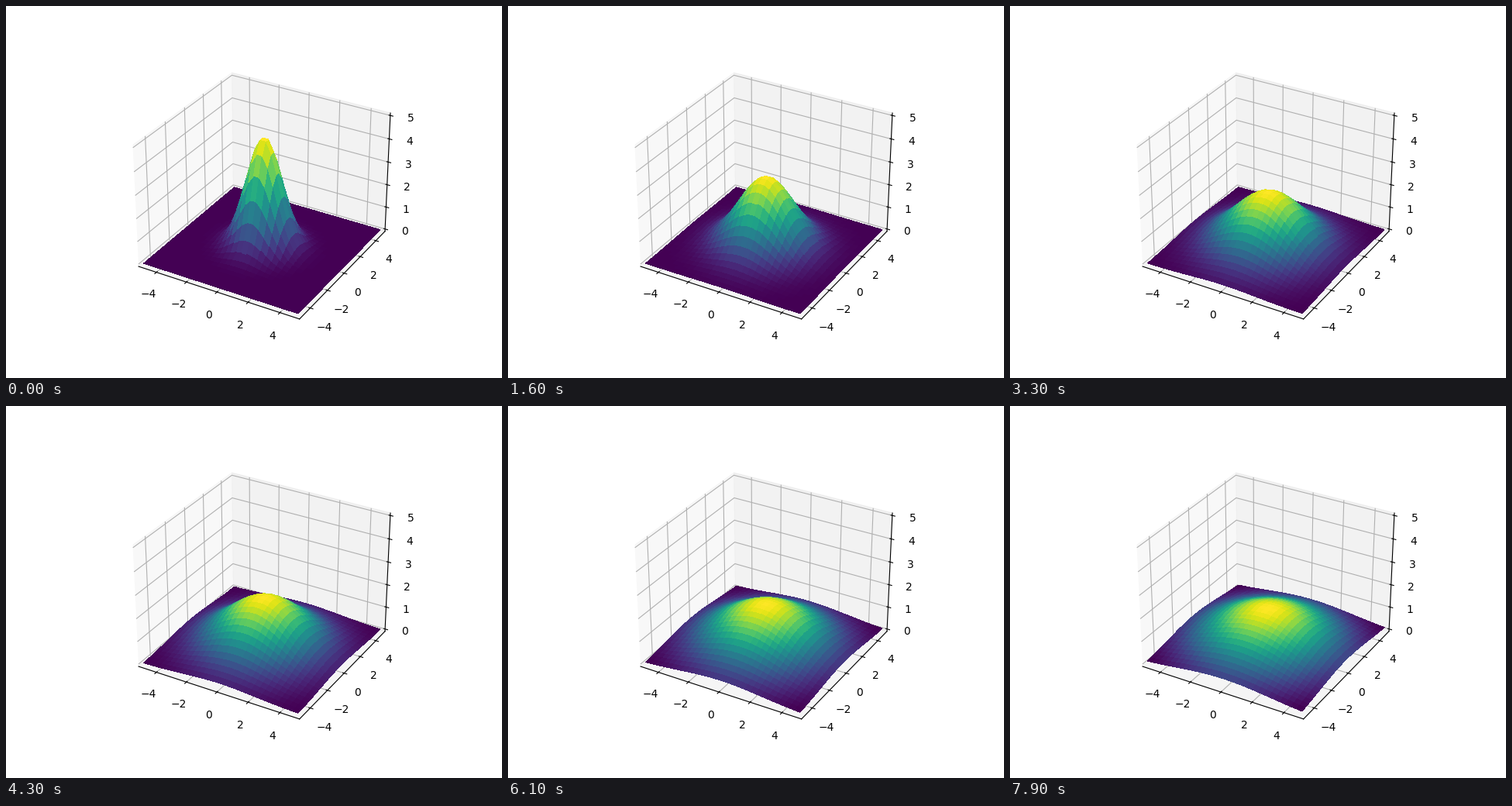
A matplotlib script that plays this animation: 640x480 px, repeating every 8 s.

```python
import numpy as np
import matplotlib.pyplot as plt
from matplotlib.animation import FuncAnimation

FRAMES, INTERVAL = 80, 100
HALF, TOP = 5, 5
MARGIN = 1 / 48  # breathing room on each side of an axis, as a share of its span

fig = plt.figure(figsize=(6.4, 4.8), dpi=100)
ax = fig.add_subplot(projection="3d")


def padded(lo, hi):
    pad = (hi - lo) * MARGIN
    return lo - pad, hi + pad


ax.set_xlim(*padded(-HALF, HALF))
ax.set_ylim(*padded(-HALF, HALF))
ax.set_zlim(*padded(0, TOP))

line = np.linspace(-HALF, HALF, 30)
X, Y = np.meshgrid(line, line)
R2 = X**2 + Y**2
surface = None


def bell(var):
    """Spreading Gaussian whose height falls with its width."""
    return TOP / np.sqrt(var) * np.exp(-R2 / (2 * var))


def update(i):
    global surface
    if surface is not None:
        surface.remove()
    var = 1.1 + i * INTERVAL / 1000
    surface = ax.plot_surface(X, Y, bell(var), cmap="viridis",
                              linewidth=0, antialiased=False)
    return [surface]


anim = FuncAnimation(fig, update, frames=FRAMES, interval=INTERVAL,
                     repeat=True, repeat_delay=0, blit=False)
plt.show()
```
